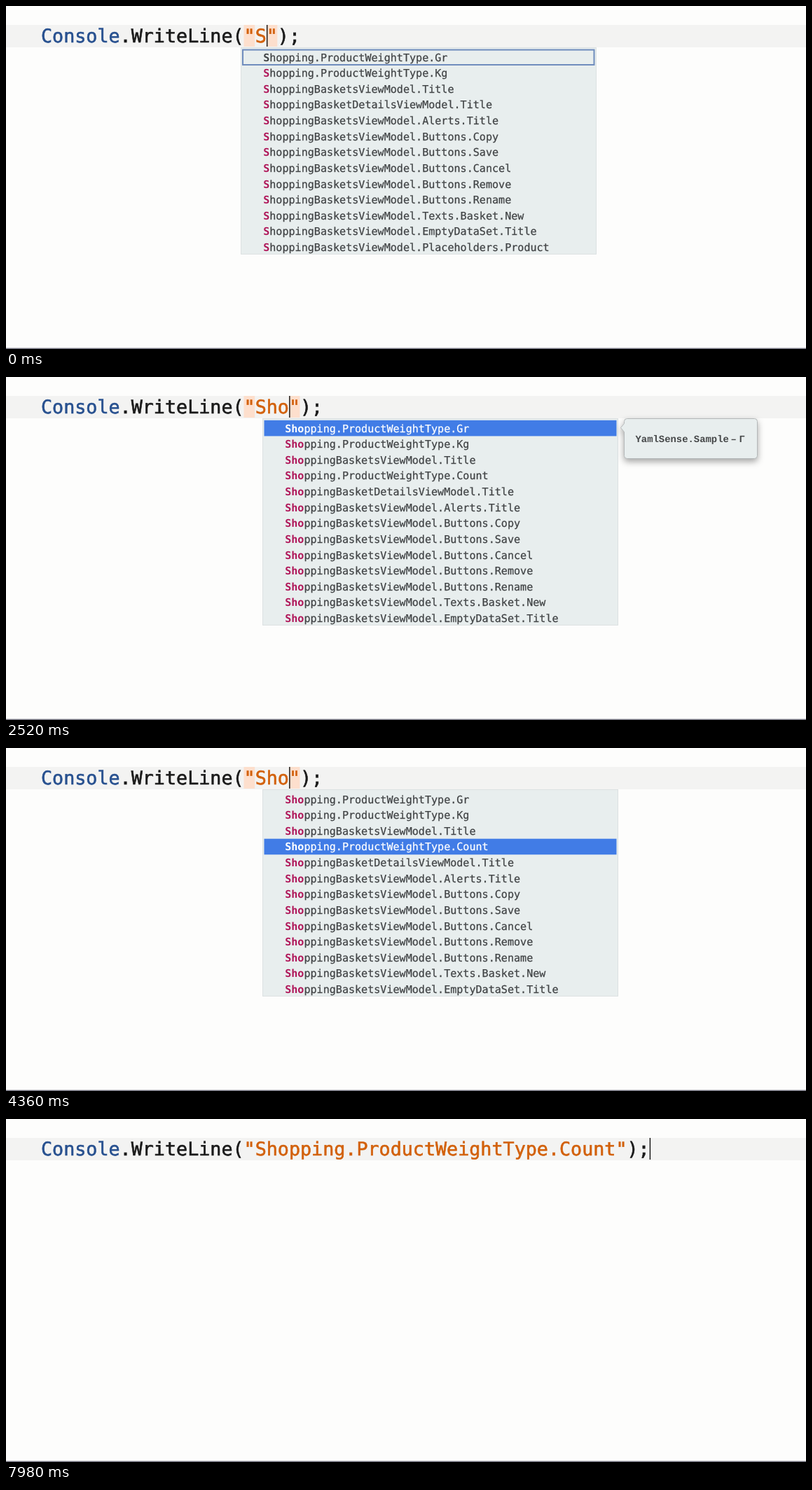
Animation of 1142x490 px, one loop 8000 ms. Source, as an HTML page:

```html
<!DOCTYPE html>
<html lang="en">
<head>
<meta charset="utf-8">
<title>Code completion</title>
<style>
  html, body { margin: 0; width: 100%; height: 100%; overflow: hidden; background: #fdfdfc; }
  svg { display: block; width: 1142px; height: 490px; }
  text { white-space: pre; text-rendering: geometricPrecision; font-family: "DejaVu Sans Mono", monospace; }
  text, tspan { fill: currentColor; stroke: currentColor; }
  .code { font-size: 26.72px; color: #1a1a1a; stroke-width: .6; }
  .type { color: #27508f; }
  .string { color: #d2600a; }
  .quote { fill: #fddfcd; }
  .row { font-size: 15.09px; color: #404345; stroke-width: .25; }
  .hit { font-weight: bold; color: #b0185a; stroke-width: 0; }
  .outlined .hit { color: #404345; }
  .active, .active .hit { color: #fff; }
  .panel { fill: #e8eeee; stroke: #dce1e2; }
  .outline { fill: none; stroke: #6f8cbd; stroke-width: 2; }
  .bar { fill: #417ce6; }
  .bubble { fill: #e8eeee; stroke: #b4b8b9; filter: drop-shadow(0 4px 5px rgba(0, 0, 0, .35)); }
  .tip { font: bold 13.9px "Liberation Mono", monospace; color: #454748; stroke-width: 0; }
</style>
</head>
<body>
<svg viewBox="0 0 1142 490">
  <rect width="1142" height="490" fill="#fdfdfc"/>
  <rect y="27" width="1142" height="32" fill="#f3f3f2"/>
  <rect y="488.6" width="1142" height="1.4" fill="#70707d"/>
  <g id="quotes"></g>
  <text class="code" x="50" y="51.6"><tspan class="type">Console</tspan>.WriteLine(<tspan class="string" id="literal"></tspan>);</text>
  <g id="popup"></g>
  <rect id="caret" y="27" width="1.4" height="31" fill="#111"/>
</svg>
<script>
const LOOP = 8000, BLINK = 500;
const LEFT = 49.5, CHAR = 16.08, OPEN_COL = 18;
const ROW_TOP = 61.8, ROW_H = 22.62;
const VALUE = 'Shopping.ProductWeightType.Count';

const basket = 'ShoppingBasketsViewModel.';
const common = [
  'ShoppingBasketDetailsViewModel.Title',
  ...['Alerts.Title', 'Buttons.Copy', 'Buttons.Save', 'Buttons.Cancel', 'Buttons.Remove',
    'Buttons.Rename', 'Texts.Basket.New', 'EmptyDataSet.Title'].map(s => basket + s)
];
const head = ['Shopping.ProductWeightType.Gr', 'Shopping.ProductWeightType.Kg', basket + 'Title'];
const shortList = [...head, ...common, basket + 'Placeholders.Product'];
const longList = [...head, VALUE, ...common];

// Each step overrides part of the state from its start time onwards.
const steps = [
  [0, { typed: 1, open: true, row: 0, active: false, tip: '', blinkFrom: 1700, end: false }],
  [300, { typed: 2 }],
  [580, { tip: 'Г' }],
  [780, { typed: 3 }],
  [1900, { active: true }],
  [3680, { row: 1, tip: '' }],
  [4000, { row: 2 }],
  [4280, { row: 3 }],
  [4740, { tip: 'ШТ' }],
  [5680, { typed: VALUE.length, open: false, blinkFrom: 6700 }],
  [7700, { end: true, blinkFrom: LOOP }]
];

const $ = id => document.getElementById(id);
const colX = col => LEFT + col * CHAR;
const rect = (cls, x, y, w, h) => `<rect class="${cls}" x="${x}" y="${y}" width="${w}" height="${h}"/>`;

function bubble(x, row, label) {
  const top = row ? 109.5 : 59.5, tipY = row ? 138.5 : 72.5;
  const w = label.length > 1 ? 203 : 190, h = 57, r = 4;
  const shape = `M${x + r} ${top}h${w - 2 * r}q${r} 0 ${r} ${r}v${h - 2 * r}q0 ${r} ${-r} ${r}` +
    `h${2 * r - w}q${-r} 0 ${-r} ${-r}V${tipY + 6}l-5 -6l5 -6V${top + r}q0 ${-r} ${r} ${-r}z`;
  const y = top + 33;
  return `<path class="bubble" d="${shape}"/><text class="tip" x="${x + 16}" y="${y}">YamlSense.Sample</text>` +
    `<text class="tip" x="${x + 152}" y="${y}">–</text><text class="tip" x="${x + 164}" y="${y}">${label}</text>`;
}

function popup(s) {
  if (!s.open) return '';
  const x = Math.round(318.6 + 15.9 * s.typed);
  const rowY = ROW_TOP + s.row * ROW_H;
  const items = s.typed > 1 ? longList : shortList;
  const rows = items.map((item, i) => {
    const mark = i !== s.row ? '' : s.active ? 'active' : 'outlined';
    return `<text class="row ${mark}" x="${x + 32.2}" y="${78.6 + i * ROW_H}">` +
      `<tspan class="hit">${item.slice(0, s.typed)}</tspan>${item.slice(s.typed)}</text>`;
  });
  return rect('panel', x + .5, 59.5, 507, 295) +
    (s.active ? rect('bar', x + 2.5, rowY, 503, ROW_H) : rect('outline', x + 3, rowY + .8, 501.5, 21.4)) +
    rows.join('') + (s.tip ? bubble(x + 516.5, s.row, s.tip) : '');
}

function render(s) {
  const closeCol = OPEN_COL + 1 + s.typed;
  $('literal').textContent = `"${VALUE.slice(0, s.typed)}"`;
  $('quotes').innerHTML = s.end ? '' :
    [OPEN_COL, closeCol].map(c => rect('quote', colX(c) + .6, 27, 15.6, 31)).join('');
  $('caret').setAttribute('x', colX(closeCol + (s.end ? 3 : 0)) + .9);
  $('popup').innerHTML = popup(s);
}

let shown = 0;
function tick(now) {
  const t = now % LOOP;
  const past = steps.filter(([at]) => at <= t);
  const state = Object.assign({}, ...past.map(([, change]) => change));
  if (past.length !== shown) {
    shown = past.length;
    render(state);
  }
  const off = t >= state.blinkFrom && Math.floor((t - state.blinkFrom) / BLINK) % 2 === 0;
  $('caret').style.visibility = off ? 'hidden' : 'visible';
}

const start = performance.now();
function frame() {
  tick(performance.now() - start);
  requestAnimationFrame(frame);
}
frame();
</script>
</body>
</html>
```
